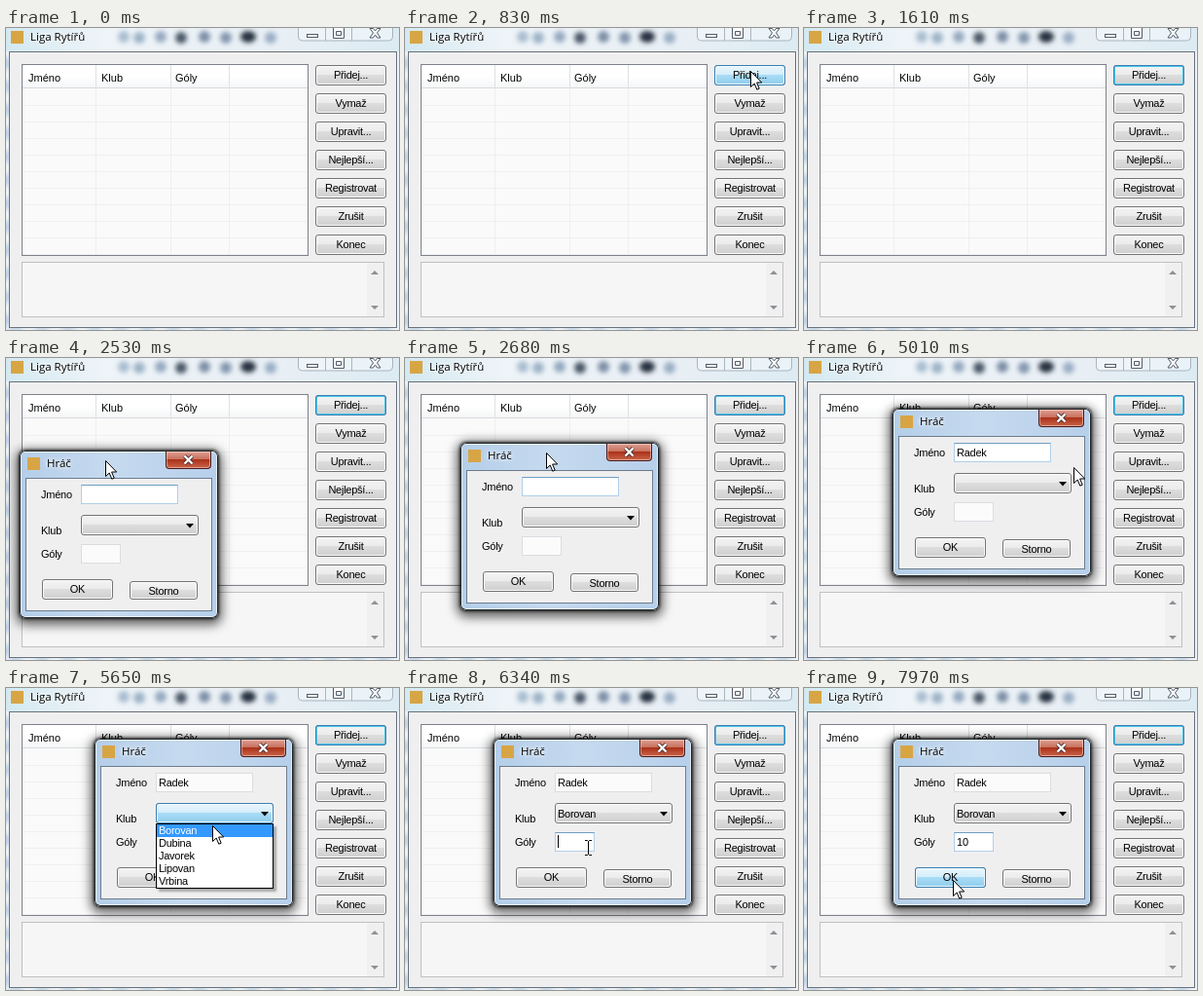
An HTML page for the animation above (8 s loop, 404 px wide and 310 px high).

```html
<!DOCTYPE html>
<html lang="cs">
<head>
<meta charset="utf-8">
<title>Liga Rytířů</title>
<style>
html, body { margin: 0; width: 100%; height: 100%; overflow: hidden; }
body { position: relative; background: #e9f0f5; }
#stage { position: absolute; left: 0; top: 0; width: 404px; height: 310px; overflow: hidden;
  font: 11px/12px "Liberation Sans", Arial, sans-serif; letter-spacing: -.25px; color: #000; }
#stage div, #stage svg, #stage b { position: absolute; box-sizing: border-box; }
#stage b { font-weight: normal; white-space: pre; }
#stage .title { font: 11.5px/16px "Open Sans", "Noto Sans", sans-serif; letter-spacing: 0; text-shadow: 0 0 4px #fff, 0 0 6px #fff; }
.icon { width: 13px; height: 13px; background: #d8a544; }

/* main window */
#glass { left: 0; top: 0; }
#client { left: 3px; top: 24px; width: 399px; height: 284px; background: #f0eff0; border: 1px solid #68717a; }
#list { left: 16px; top: 37px; width: 295px; height: 197px; border: 1px solid #7d828a; background:
  repeating-linear-gradient(transparent 0 16px, #f0f0f0 16px 17px) 0 25px no-repeat, #fafafa; }
#head { left: 0; top: 0; width: 293px; height: 24px; background: linear-gradient(#fff 50%, #f5f6f7); border-bottom: 1px solid #d8dade; }
.col { top: 0; width: 1px; height: 195px; background: linear-gradient(#dfe1e5 24px, #efefef 24px); }
.head { top: 7px; letter-spacing: 0; }
#log { left: 16px; top: 240px; width: 373px; height: 57px; background: #f6f6f6; border: 1px solid #bfc0c3; }
#bar { right: 0; top: 0; width: 17px; height: 55px; background: #f0f0f0; }

.btn { border: 1px solid #747474; border-radius: 3px; text-align: center; line-height: 19px;
  background: linear-gradient(#f3f3f3, #ebebeb 49%, #dddddd 50%, #cfcfcf); box-shadow: inset 0 0 0 1px #fbfbfb; }
.side { left: 318px; width: 73px; height: 21px; }
.look { left: -1px; top: -1px; right: -1px; bottom: -1px; border: 1px solid #3c7fb1; border-radius: 3px; opacity: 0; line-height: 19px; }
.default { box-shadow: inset 0 0 0 1px #46c8ef; }
.hot { background: linear-gradient(#eaf6fd, #d3edfb 49%, #a9dcf6 50%, #8fcdec); box-shadow: inset 0 0 0 1px #f0faff; }
.down { background: linear-gradient(#d8eefa, #b5dcf1 49%, #8fc8e6 50%, #6cb3da); border-color: #2c628b; }

/* dialog */
#dialog { left: 0; top: 0; width: 204px; height: 172px; border-radius: 6px; transform: translate(-400px, 0);
  background: linear-gradient(90deg, #b4cee9, #c6daef 45%, #b6cfea);
  box-shadow: inset 0 0 0 1px #23272a, inset 0 0 0 2px rgba(255,255,255,.65), 0 0 3px 1px rgba(0,0,0,.75), 0 3px 11px 4px rgba(0,0,0,.6); }
#face { left: 6px; top: 28px; width: 192px; height: 137px; background: #f0eff0; border: 1px solid #6c7c8c; }
#close { left: 150px; top: 1px; width: 47px; height: 18px; border: 1px solid #48191a; border-top: 0; border-radius: 0 0 4px 4px;
  background: linear-gradient(#dda093, #c86f5c 48%, #ab3219 50%, #c8654a); box-shadow: inset 0 0 0 1px rgba(255,220,210,.5); }
.field { background: #fbfbfb; border: 1px solid #dadde0; height: 20px; }
.focus { left: -1px; top: -1px; right: -1px; bottom: -1px; border: 1px solid #b0cfe8; border-top-color: #6f9fc4; background: #fff; opacity: 0; }
.type { left: 2px; top: 3px; }
.type span, #pick, .caret, #drop { opacity: 0; }
.caret { left: 2px; top: 2px; width: 1px; height: 13px; background: #000; }
#drop { left: 63px; top: 87px; width: 121px; height: 67px; background: #fff; border: 1px solid #000;
  box-shadow: 3px 3px 2px rgba(0,0,0,.3); line-height: 13px; white-space: pre; }
#drop p { margin: 0; padding-left: 2px; height: 13px; }
#drop p:first-child { animation: pickRow 8s step-end infinite; }

/* timing */
#dialog { animation: drag 8s step-end infinite; }
#arrow { left: 0; top: 0; transform: translate(-50px, 0); animation: arrow 8s step-end infinite; }
#beam { left: -4px; top: -9px; transform: translate(-50px, 0); animation: beam 8s step-end infinite; }
#addDefault { animation: addDefault 8s step-end infinite; }
#addHot { animation: addHot 8s step-end infinite; }
#addDown { animation: addDown 8s step-end infinite; }
#nameFocus { animation: nameFocus 8s step-end infinite; }
#goalFocus { animation: goalFocus 8s step-end infinite; }
#nameCaret { animation: nameCaret 8s step-end infinite; }
#goalCaret { animation: goalCaret 8s step-end infinite; }
#comboHot { animation: comboHot 8s step-end infinite; }
#drop { animation: drop 8s step-end infinite; }
#pick { animation: pick 8s step-end infinite; }
#okHot { animation: okHot 8s step-end infinite; }
#name span { animation: key1 8s step-end infinite; }
#name span:nth-child(2) { animation-name: key2; }
#name span:nth-child(3) { animation-name: key3; }
#name span:nth-child(4) { animation-name: key4; }
#name span:nth-child(5) { animation-name: key5; }
#goals span { animation: goal1 8s step-end infinite; }
#goals span:nth-child(2) { animation-name: goal2; }

@keyframes addDefault { 0% { opacity: 0 } 14.125%, 100% { opacity: 1 } }
@keyframes addHot { 0%, 14.125%, 100% { opacity: 0 } 9.375% { opacity: 1 } }
@keyframes addDown { 0%, 14.125%, 100% { opacity: 0 } 13.25% { opacity: 1 } }
@keyframes nameFocus { 0%, 100% { opacity: 1 } 68.625% { opacity: 0 } }
@keyframes goalFocus { 0% { opacity: 0 } 78.25%, 100% { opacity: 1 } }
@keyframes nameCaret { 0%, 45.25%, 100% { opacity: 0 } 40.5% { opacity: 1 } }
@keyframes goalCaret { 0%, 86.125%, 100% { opacity: 0 } 79.25% { opacity: 1 } }
@keyframes comboHot { 0%, 75.375%, 100% { opacity: 0 } 66.75% { opacity: 1 } }
@keyframes drop { 0%, 74.375%, 100% { opacity: 0 } 68.625% { opacity: 1 } }
@keyframes pickRow { 0% { background: #fff; color: #000 } 70.375%, 100% { background: #3399ff; color: #fff } }
@keyframes pick { 0% { opacity: 0 } 74.375%, 100% { opacity: 1 } }
@keyframes okHot { 0% { opacity: 0 } 99.625%, 100% { opacity: 1 } }
@keyframes key1 { 0% { opacity: 0 } 45.25%, 100% { opacity: 1 } }
@keyframes key2 { 0% { opacity: 0 } 48.125%, 100% { opacity: 1 } }
@keyframes key3 { 0% { opacity: 0 } 49.125%, 100% { opacity: 1 } }
@keyframes key4 { 0% { opacity: 0 } 51%, 100% { opacity: 1 } }
@keyframes key5 { 0% { opacity: 0 } 52%, 100% { opacity: 1 } }
@keyframes goal1 { 0% { opacity: 0 } 86.125%, 100% { opacity: 1 } }
@keyframes goal2 { 0% { opacity: 0 } 89.125%, 100% { opacity: 1 } }
@keyframes drag {
  0% { transform: translate(-400px, 0) }
  31.625% { transform: translate(14px, 95px) }
  32.625% { transform: translate(36px, 92px) }
  33.5% { transform: translate(57px, 87px) }
  34.75%, 100% { transform: translate(91px, 52px) }
}
@keyframes arrow {
  0%, 20.125%, 45.25%, 77.25%, 100% { transform: translate(-50px, 0) }
  2.625% { transform: translate(300px, 191px) }
  3.625% { transform: translate(301px, 159px) }
  5.5% { transform: translate(305px, 138px) }
  6.5% { transform: translate(315px, 112px) }
  7.5% { transform: translate(328px, 85px) }
  8.375% { transform: translate(340px, 66px) }
  9.375% { transform: translate(350px, 51px) }
  10.375% { transform: translate(355px, 44px) }
  16.375% { transform: translate(330px, 55px) }
  17.375% { transform: translate(280px, 80px) }
  18.25% { transform: translate(212px, 106px) }
  19.25% { transform: translate(157px, 118px) }
  31.625% { transform: translate(102px, 105px) }
  32.625% { transform: translate(124px, 102px) }
  33.5% { transform: translate(145px, 97px) }
  34.75% { transform: translate(179px, 62px) }
  37.5% { transform: translate(190px, 54px) }
  38.5% { transform: translate(212px, 40px) }
  39.5% { transform: translate(236px, 24px) }
  40.5% { transform: translate(250px, 15px) }
  57.875% { transform: translate(254px, 2px) }
  58.875% { transform: translate(266px, 22px) }
  59.75% { transform: translate(278px, 52px) }
  60.75% { transform: translate(284px, 80px) }
  61.625% { transform: translate(283px, 99px) }
  62.625% { transform: translate(277px, 112px) }
  63.625% { transform: translate(236px, 141px) }
  64.625% { transform: translate(170px, 159px) }
  65.625% { transform: translate(131px, 152px) }
  66.75% { transform: translate(190px, 135px) }
  67.75% { transform: translate(226px, 127px) }
  69.5% { transform: translate(222px, 133px) }
  70.375% { transform: translate(212px, 141px) }
  71.25% { transform: translate(205px, 144px) }
  75.375% { transform: translate(202px, 148px) }
  76.375% { transform: translate(198px, 154px) }
  95.875% { transform: translate(174px, 179px) }
  96.75% { transform: translate(161px, 207px) }
  97.75% { transform: translate(152px, 223px) }
  98.75% { transform: translate(151px, 211px) }
  99.625% { transform: translate(153px, 197px) }
}
@keyframes beam {
  0%, 86.125%, 95.875%, 100% { transform: translate(-50px, 0) }
  77.25% { transform: translate(193px, 159px) }
  78.25% { transform: translate(190px, 162px) }
  79.25% { transform: translate(188px, 164px) }
  94.875% { transform: translate(183px, 162px) }
}
</style>
</head>
<body>
<div id="stage">
  <svg id="glass" width="404" height="310">
    <defs>
      <filter id="soft" x="-100%" y="-100%" width="300%" height="300%"><feGaussianBlur stdDeviation="2.4"/></filter>
      <linearGradient id="sky"><stop stop-color="#d3e9f2"/><stop offset=".25" stop-color="#eef4f8"/><stop offset=".7" stop-color="#e8eff5"/><stop offset="1" stop-color="#dcebf3"/></linearGradient>
    </defs>
    <rect width="404" height="310" fill="#edf3f8"/>
    <rect width="404" height="24" fill="url(#sky)"/>
    <g id="blobs" filter="url(#soft)"></g>
    <path d="M300.500 0V9q0 4 4 4H393.500q4 0 4-4V0M328.500 0V13M355.500 0V13" fill="rgba(255,255,255,.35)" stroke="#a9b4be"/>
    <g fill="#fff" stroke="#535b66">
      <rect x="309.500" y="6.500" width="11" height="3"/>
      <path d="M336.500 -1V10.500H347.500V-1ZM339.500 3.500H344.500V7.500H339.500Z"/>
      <path d="M374 0.500h3.500l2 2.500 2-2.500h3.500l-3.500 4.500 3.500 5h-3.500l-2-3-2 3h-3.500l3.500-5z"/>
    </g>
  </svg>
  <div class="icon" style="left:5px;top:3px"></div>
  <b class="title" style="left:25px;top:1px">Liga Rytířů</b>

  <div id="client"></div>
  <div id="list">
    <div id="head"></div>
    <div class="col" style="left:75px"></div>
    <div class="col" style="left:152px"></div>
    <div class="col" style="left:212px"></div>
    <b class="head" style="left:6px">Jméno</b>
    <b class="head" style="left:81px">Klub</b>
    <b class="head" style="left:157px">Góly</b>
  </div>
  <div id="log"><div id="bar">
    <svg width="17" height="55"><path d="M4 12l4-4 4 4zM4 44l4 4 4-4z" fill="#8d9096"/></svg>
  </div></div>

  <div class="btn side" style="top:38px">Přidej...
    <div id="addDefault" class="look default"></div>
    <div id="addHot" class="look hot">Přidej...</div>
    <div id="addDown" class="look down">Přidej...</div>
  </div>
  <div class="btn side" style="top:67px">Vymaž</div>
  <div class="btn side" style="top:96px">Upravit...</div>
  <div class="btn side" style="top:125px">Nejlepší...</div>
  <div class="btn side" style="top:154px">Registrovat</div>
  <div class="btn side" style="top:183px">Zrušit</div>
  <div class="btn side" style="top:212px">Konec</div>

  <div id="dialog">
    <div class="icon" style="left:8px;top:7px"></div>
    <b class="title" style="left:28px;top:5px">Hráč</b>
    <div id="close"><svg width="45" height="17"><path d="M18.500 4.500l8 8m0-8l-8 8" stroke="#4b3030" stroke-width="4"/><path d="M18.500 4.500l8 8m0-8l-8 8" stroke="#fff" stroke-width="2.400"/></svg></div>
    <div id="face"></div>
    <b style="left:22px;top:39px">Jméno</b>
    <b style="left:22px;top:76px">Klub</b>
    <b style="left:22px;top:100px">Góly</b>
    <div class="field" style="left:63px;top:35px;width:100px">
      <div id="nameFocus" class="focus"></div>
      <b id="name" class="type"><span>R</span><span>a</span><span>d</span><span>e</span><span>k</span></b>
      <div id="nameCaret" class="caret"></div>
    </div>
    <div class="btn" style="left:63px;top:66px;width:121px;height:21px">
      <div id="comboHot" class="look hot"></div>
      <b id="pick" style="left:2px;top:4px;line-height:12px">Borovan</b>
      <svg style="left:107px;top:8px" width="8" height="5"><path d="M0 0h8l-4 4.500z"/></svg>
    </div>
    <div class="field" style="left:63px;top:96px;width:41px">
      <div id="goalFocus" class="focus"></div>
      <b id="goals" class="type"><span>1</span><span>0</span></b>
      <div id="goalCaret" class="caret"></div>
    </div>
    <div class="btn" style="left:23px;top:132px;width:73px;height:21px">OK
      <div id="okHot" class="look hot">OK</div>
    </div>
    <div class="btn" style="left:113px;top:134px;width:70px;height:19px;line-height:18px">Storno</div>
    <div id="drop"><p>Borovan</p><p>Dubina</p><p>Javorek</p><p>Lipovan</p><p>Vrbina</p></div>
  </div>

  <svg id="beam" width="9" height="18"><path d="M1 1.500h2.500l1 1 1-1H8M4.500 2V16M1 16.500h2.500l1-1 1 1H8" fill="none" stroke="#000"/></svg>
  <svg id="arrow" width="13" height="21"><path d="M.5 .5V16.500L4.200 13l2.600 6.200 2.400-1L6.600 12H11.700Z" fill="#fff" stroke="#000"/></svg>
</div>
<script>
const blobs = document.getElementById('blobs');
function blob(x, y, rx, ry, color) {
  const e = document.createElementNS('http://www.w3.org/2000/svg', 'ellipse');
  for (const [key, value] of Object.entries({ cx: x, cy: y, rx, ry, fill: color })) e.setAttribute(key, value);
  blobs.append(e);
}
// desktop shapes seen through the caption and the window edges
const shades = ['#a9bdd0', '#9db3c8', '#94a9bf', '#4a5666', '#7d8ea6', '#8496ae', '#28303f', '#9aaec4'];
shades.forEach((color, i) => blob([121, 137, 159, 180, 204, 226, 249, 272][i], 9 + i % 2, i === 6 ? 8 : 6, 6, color));
for (let y = 36; y < 310; y += 24) blob(0, y, 2.5, 7, '#9dbbdb');
for (let x = 10; x < 404; x += 27) blob(x, 311, 8, 2.5, '#a9c2dc');
</script>
</body>
</html>
```
